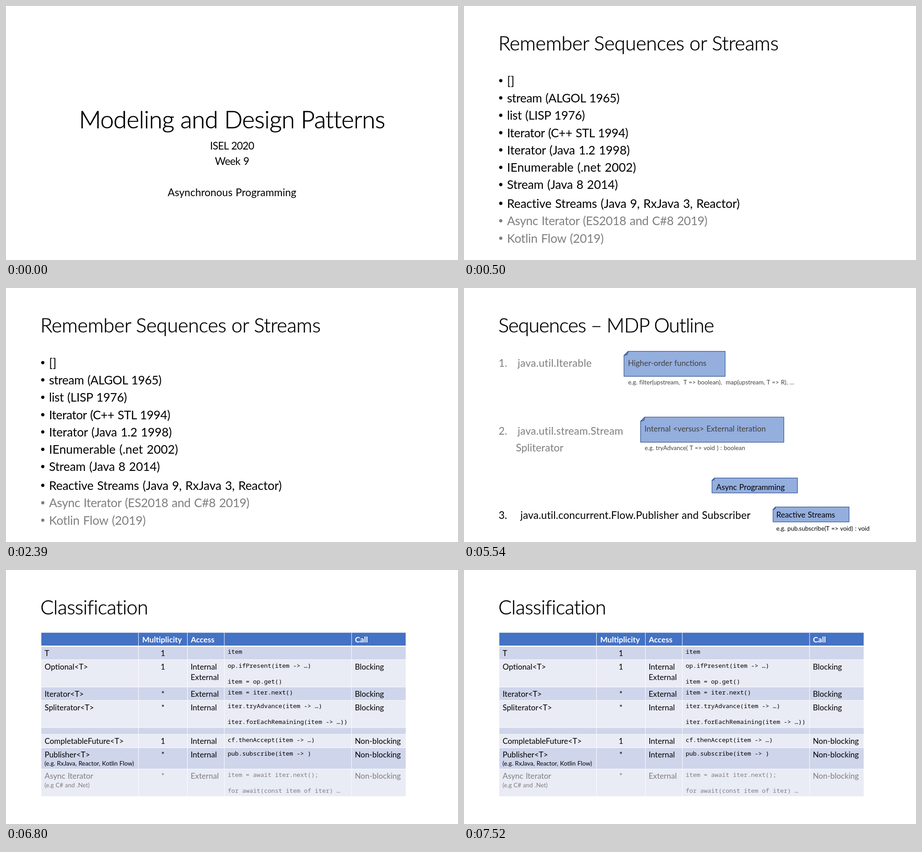
Animation, 998 px wide and 561 px high, one loop 8 s. Source, as an HTML page:

```html
<!DOCTYPE html>
<html lang="en">
<head>
<meta charset="utf-8">
<title>Slides</title>
<style>
  html, body { margin: 0; width: 100%; height: 100%; overflow: hidden; background: #fff; }
  svg { display: block; width: 100%; height: 100%; }
  text { font-family: Lato, "Open Sans", sans-serif; word-spacing: .05em; white-space: pre; }
  .light { font-weight: 300; word-spacing: 0; stroke: #000; stroke-width: .012em; }
  .bold { font-weight: 700; }
  .mono { font-family: "Noto Sans Mono", "DejaVu Sans Mono", monospace; word-spacing: 0; }
</style>
</head>
<body>
<svg id="stage" viewBox="0 0 998 561"></svg>
<script>
const NS = "http://www.w3.org/2000/svg";
const stage = document.getElementById("stage");
const GRAY = "#7f7f7f", DARK = "#404040", BLACK = "#000", WHITE = "#fff";
const BODY = 22.95, LIST = 26.6, LABEL = 17.2, NOTE = 13.4, CODE = 13.36;
const LOOP = 8000;

function add(parent, tag, attrs) {
  const el = document.createElementNS(NS, tag);
  for (const k in attrs) el.setAttribute(k, attrs[k]);
  parent.appendChild(el);
  return el;
}

function write(g, str, x, y, size, opt = {}) {
  const el = add(g, "text", {
    x, y, "font-size": size, fill: opt.fill || BLACK,
    "text-anchor": opt.anchor || "start", class: opt.cls || ""
  });
  if (opt.track) el.setAttribute("letter-spacing", opt.track);
  el.textContent = str;
}

function slide(start, draw) {
  const g = add(stage, "g", { visibility: "hidden" });
  draw(g);
  return { start, g };
}

const heading = (g, str, track) => write(g, str, 76, 98, 43.6, { cls: "light", track });

function cover(g) {
  const mid = (str, y, size, track, cls) => write(g, str, 499, y, size, { anchor: "middle", track, cls });
  mid("Modeling and Design Patterns", 270, 53.5, -0.67, "light");
  mid("ISEL 2020", 317, BODY, -0.7);
  mid("Week 9", 351, BODY, -0.5);
  mid("Asynchronous Programming", 420, BODY);
}

function history(g) {
  heading(g, "Remember Sequences or Streams", -0.3);
  // text, baseline, tracking, colour
  [
    ["[]", 174.5, 0],
    ["stream (ALGOL 1965)", 212.5, -0.4],
    ["list (LISP 1976)", 251, -0.3],
    ["Iterator (C++ STL 1994)", 289.5, -0.47],
    ["Iterator (Java 1.2 1998)", 327.5, -0.15],
    ["IEnumerable (.net 2002)", 366, 0.1],
    ["Stream (Java 8 2014)", 404, -0.15],
    ["Reactive Streams (Java 9, RxJava 3, Reactor)", 445.5, -0.1],
    ["Async Iterator (ES2018 and C#8 2019)", 484, -0.41, GRAY],
    ["Kotlin Flow (2019)", 522.5, -0.2, GRAY]
  ].forEach(([str, y, track, fill]) => {
    add(g, "circle", { cx: 81.2, cy: y - 9.7, r: 3.6, fill: fill || BLACK });
    write(g, str, 95, y, LIST, { fill, track });
  });
}

// Box with its top left corner folded over
function card(g, x, y, w, h) {
  const f = h / 6, r = x + w, b = y + h;
  const line = { stroke: "#2f528f", "stroke-width": 1.2, "stroke-linejoin": "round" };
  add(g, "path", { d: `M${x + f} ${y}H${r}V${b}H${x}V${y + f}Z`, fill: "#94aedd", ...line });
  add(g, "path", { d: `M${x} ${y + f}L${x + f * .8} ${y + f * .8}L${x + f} ${y}Z`, fill: "#778cb1", ...line });
}

function outline(g) {
  heading(g, "Sequences – MDP Outline", -1);

  card(g, 353.2, 139.8, 223.4, 55.4);
  card(g, 389.8, 285.2, 316.4, 55.4);
  card(g, 547.5, 419.6, 188.8, 33);
  card(g, 682.3, 483.6, 167.9, 33);

  const item = (str, x, y, track, fill) => write(g, str, x, y, BODY, { track, fill });
  item("1.", 76.5, 174, 0, GRAY);
  item("java.util.Iterable", 118.5, 174, 0.28, GRAY);
  item("2.", 76.5, 323.5, 0, GRAY);
  item("java.util.stream.Stream", 118.5, 323.5, 0.28, GRAY);
  item("Spliterator", 114.5, 360.5, 0, GRAY);
  item("3.", 76.5, 510, 0);
  item("java.util.concurrent.Flow.Publisher and Subscriber", 124.5, 510, 0.14);

  const label = (str, x, y, fill) => write(g, str, x, y, LABEL, { fill });
  label("Higher-order functions", 362, 171.8, DARK);
  label("Internal <versus> External iteration", 398.5, 317, DARK);
  label("Async Programming", 557, 445.5);
  label("Reactive Streams", 689.5, 507);

  const note = (str, x, y, fill) => write(g, str, x, y, NOTE, { fill, track: 0.03 });
  note("e.g. filter(upstream,  T => boolean),  map(upstream, T => R), …", 362.5, 212.7, DARK);
  note("e.g. tryAdvance( T => void ) : boolean", 399, 358, DARK);
  note("e.g. pub.subscribe(T => void) : void", 689.5, 535.8);
}

function table(g) {
  heading(g, "Classification", -0.6);

  const cols = [78, 292.5, 400.5, 482, 763, 882.5];
  const rows = [138.5, 168.3, 198, 258.3, 288, 348, 363, 392.5, 439.7, 499.7];
  const left = cols[0], width = cols[5] - left;
  rows.slice(0, -1).forEach((y, i) => {
    const fill = i ? (i % 2 ? "#cfd5ea" : "#e9ebf5") : "#4472c4";
    add(g, "rect", { x: left, y, width, height: rows[i + 1] - y, fill });
  });
  rows.slice(1, -1).forEach((y, i) =>
    add(g, "path", { d: `M${left} ${y}h${width}`, stroke: WHITE, "stroke-width": i ? 1 : 2.4 }));
  cols.slice(1, -1).forEach(x =>
    add(g, "path", { d: `M${x} ${rows[0]}V${rows[9]}`, stroke: WHITE, "stroke-width": 1 }));

  const head = { fill: WHITE, cls: "bold" };
  write(g, "Multiplicity", 344.5, 160, LABEL, { ...head, anchor: "middle" });
  write(g, "Access", 408, 160, LABEL, head);
  write(g, "Call", 770.5, 160, LABEL, head);

  // baseline, type, count, access, call, colour
  [
    [190, "T", "1", "", ""],
    [220, "Optional<T>", "1", "Internal", "Blocking"],
    [242.5, "", "", "External", ""],
    [279.7, "Iterator<T>", "*", "External", "Blocking"],
    [309.5, "Spliterator<T>", "*", "Internal", "Blocking"],
    [384.2, "CompletableFuture<T>", "1", "Internal", "Non-blocking"],
    [414, "Publisher<T>", "*", "Internal", "Non-blocking"],
    [461.3, "Async Iterator", "*", "External", "Non-blocking", GRAY]
  ].forEach(([y, type, count, access, call, fill]) => {
    write(g, type, 85.3, y, LABEL, { fill });
    write(g, count, 346.5, y, LABEL, { fill, anchor: "middle" });
    write(g, access, 407.7, y, LABEL, { fill });
    write(g, call, 770.2, y, LABEL, { fill });
  });
  write(g, "(e.g. RxJava, Reactor, Kotlin Flow)", 85, 432.2, NOTE);
  write(g, "(e.g C# and .Net)", 85, 479.5, NOTE, { fill: GRAY });

  [
    [185.3, "item"],
    [215.5, "op.ifPresent(item -> …)"],
    [250.5, "item = op.get()"],
    [275.2, "item = iter.next()"],
    [305, "iter.tryAdvance(item -> …)"],
    [340, "iter.forEachRemaining(item -> …))"],
    [379.8, "cf.thenAccept(item -> …)"],
    [409.8, "pub.subscribe(item -> )"],
    [457.2, "item = await iter.next();", GRAY],
    [492.3, "for await(const item of iter) …", GRAY]
  ].forEach(([y, str, fill]) => write(g, str, 489.5, y, CODE, { fill, cls: "mono" }));
}

const slides = [
  slide(0, cover),
  slide(500, history),
  slide(3650, outline),
  slide(6800, table)
];

function render(now) {
  const t = now % LOOP;
  const shown = slides.filter(s => t >= s.start).pop();
  for (const s of slides) s.g.setAttribute("visibility", s === shown ? "visible" : "hidden");
}

function tick() {
  render(performance.now());
  requestAnimationFrame(tick);
}
tick();
</script>
</body>
</html>
```
